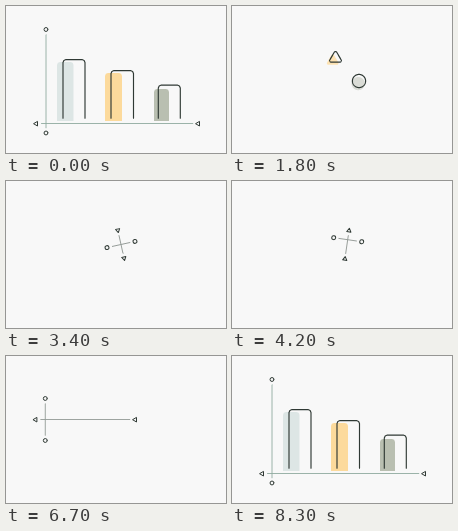
An HTML page with a canvas for the animation above (8.4 s loop, 220x147 px).

```html
<!DOCTYPE html>
<html lang="en">
<head>
<meta charset="utf-8">
<title>Chart loop</title>
<style>
  html, body { margin: 0; width: 100%; height: 100%; overflow: hidden; background: #f8f8f8; }
  canvas { display: block; width: 100vw; height: 100vh; }
</style>
</head>
<body>
<canvas id="stage"></canvas>
<script>
const LOOP = 8400, W = 220, H = 147, INK = '#2f3934';
const HUB = { x: 115, y: 63.5 };
const canvas = document.getElementById('stage');
const ctx = canvas.getContext('2d');

const mix = (a, b, k) => a + (b - a) * k;
const progress = (t, from, to) => Math.max(0, Math.min(1, (t - from) / (to - from)));
const ramp = (t, from, to) => {
  const k = progress(t, from, to);
  return k * k * (3 - 2 * k);
};
// Eased move that shoots a little past its end and settles.
const spring = (t, from, to, s = 1.35) => {
  const u = ramp(t, from, to) - 1;
  return 1 + (s + 1) * u ** 3 + s * u * u;
};

const bars = [
  { fill: '#dde6e5', x: 51, w: 16.5, h: 59, line: 57, lineW: 22, lineH: 58.7 },
  { fill: '#fcda9c', x: 99, w: 17, h: 48, line: 105, lineW: 22.5, lineH: 47.7 },
  { fill: '#b9bfb1', x: 148, w: 15, h: 32, line: 152.3, lineW: 22, lineH: 33.2 }
];

// Closed outline that starts at the bottom and runs clockwise.
const polar = radius => Array.from({ length: 121 }, (_, i) => {
  const a = i / 120 * 2 * Math.PI, r = radius(a);
  return [-r * Math.sin(a), r * Math.cos(a)];
});
const third = 2 * Math.PI / 3;
const triangle = polar(a => Math.min(6.4, 4 / Math.cos((a + third / 2) % third - third / 2)));
const circle = polar(() => 6.6);
const shapes = [
  { bar: bars[1], form: triangle, x: -11.5, y: -11.4, shift: [-2.8, 2.7], tint: '#fde2b2' },
  { bar: bars[2], form: circle, x: 12, y: 11.5, shift: [-0.8, 2.6], tint: '#dadcd6' }
];

function barPoints(x, w, base, h) {
  const r = Math.min(3, h), top = base - h, q = r * 0.29;
  return [[x, base], [x, top + r], [x + q, top + q], [x + r, top],
    [x + w - r, top], [x + w - q, top + q], [x + w, top + r], [x + w, base]];
}

// Evenly spaced points along a polyline.
function spread(points, count = 120) {
  const lengths = points.slice(1).map((p, i) => Math.hypot(p[0] - points[i][0], p[1] - points[i][1]));
  const total = lengths.reduce((a, b) => a + b, 0);
  return Array.from({ length: count + 1 }, (_, n) => {
    let rest = total * n / count, i = 0;
    while (i < lengths.length - 1 && rest > lengths[i]) rest -= lengths[i++];
    const k = lengths[i] ? rest / lengths[i] : 0;
    return [0, 1].map(j => mix(points[i][j], points[i + 1][j], k));
  });
}

const morph = (a, b, k) => {
  const end = spread(b);
  return spread(a).map((p, i) => [mix(p[0], end[i][0], k), mix(p[1], end[i][1], k)]);
};

function trace(points) {
  ctx.beginPath();
  points.forEach(p => ctx.lineTo(p[0], p[1]));
}

function fill(points, color) {
  trace(points);
  ctx.fillStyle = color;
  ctx.fill();
}

function stroke(points, width = 1.15, color = INK) {
  trace(points);
  ctx.lineWidth = width;
  ctx.strokeStyle = color;
  ctx.stroke();
}

function drawBar(bar, grow, base, gap) {
  if (grow <= 0.01) return;
  fill(barPoints(bar.x, bar.w, base - gap, bar.h * grow), bar.fill);
  stroke(barPoints(bar.line, bar.lineW, base - 2.1 * gap, bar.lineH * grow));
}

function drawShape({ bar, form, x, y, shift, tint }, t) {
  const k = ramp(t, 1500, 1780);
  const size = 1 - ramp(t, 2450, 2900);
  if (size <= 0.01) return;
  const a = -Math.PI / 4 * ramp(t, 1900, 2550);
  const reach = mix(0.55, 1, size);
  const cx = HUB.x + (x * Math.cos(a) - y * Math.sin(a)) * reach;
  const cy = HUB.y + (x * Math.sin(a) + y * Math.cos(a)) * reach;
  const place = (dx, dy) => form.map(p => [cx + p[0] * size + dx, cy + p[1] * size + dy]);
  const block = barPoints(bar.x, bar.w, 115, bar.h);
  const frame = barPoints(bar.line, bar.lineW, 112.2, bar.lineH);
  fill(morph(block, place(shift[0] * size, shift[1] * size), k), k > 0.7 ? tint : bar.fill);
  stroke(morph(frame, place(0, 0), k), 1.2);
}

function drawGlyph(x, y, size, round) {
  if (size <= 0.01) return;
  ctx.save();
  ctx.translate(x, y);
  ctx.scale(size, size);
  ctx.beginPath();
  if (round) {
    ctx.arc(0, 0, 1.95, 0, 2 * Math.PI);
  } else {
    ctx.moveTo(-2.1, 0);
    ctx.lineTo(1.5, -2.1);
    ctx.lineTo(1.5, 2.1);
    ctx.closePath();
  }
  ctx.lineWidth = 1;
  ctx.strokeStyle = INK;
  ctx.stroke();
  ctx.restore();
}

// Each pose gives the crossing point, four arm lengths, the turn and the glyph size.
function foldPose(t) {
  const keep = 1 - ramp(t, 1000, 1400), flat = 1 - ramp(t, 1500, 1750);
  return { x: 40, y: 117.5, left: 10 * flat, right: 152 * flat,
    up: 94 * keep, down: 9.5 * keep, turn: 0, glyph: keep };
}

function spinPose(t) {
  const turn = 499 * (1 - progress(t, 2600, 5600)) ** 2.13 * Math.PI / 180;
  const size = ramp(t, 2600, 3300);
  const arm = size * (17.5 + 3.5 * Math.cos(2 * turn));
  const slide = mix(-4.85 * ramp(t, 3400, 4200), 8.5, ramp(t, 4200, 5600));
  return { x: HUB.x + slide * Math.cos(turn), y: HUB.y + slide * Math.sin(turn),
    left: 14.3 * size + slide, right: 14.3 * size - slide, up: arm, down: arm, turn, glyph: size };
}

function growPose(t) {
  const out = spring(t, 5800, 6900), rise = spring(t, 6920, 8200);
  const x = mix(123.5, 40, out), y = mix(HUB.y, 117.5, rise);
  const left = mix(100, 30, out), right = mix(129, 192, rise);
  const top = mix(42.5, 23.5, spring(t, 7450, 8200));
  const bottom = mix(84.5, 127, rise) + 10 * Math.sin(Math.PI * ramp(t, 7400, 8000));
  return { x, y, left: x - left, right: right - x, up: y - top, down: bottom - y, turn: 0, glyph: 1 };
}

const poseAt = t => (t < 2600 ? foldPose : t < 5800 ? spinPose : growPose)(t);

function drawCross(pose, color) {
  const end = arm => Math.max(0, arm - 5.2);
  ctx.save();
  ctx.translate(pose.x, pose.y);
  ctx.rotate(pose.turn);
  if (pose.left + pose.right > 0.5) stroke([[-end(pose.left), 0], [end(pose.right), 0]], 0.9, color);
  if (pose.up + pose.down > 0.5) stroke([[0, -end(pose.up)], [0, end(pose.down)]], 0.9, color);
  drawGlyph(-pose.left, 0, pose.glyph, false);
  drawGlyph(pose.right, 0, pose.glyph, false);
  drawGlyph(0, -pose.up, pose.glyph, true);
  drawGlyph(0, pose.down, pose.glyph, true);
  ctx.restore();
}

function draw(t) {
  const scale = window.devicePixelRatio || 1;
  const width = Math.round(innerWidth * scale), height = Math.round(innerHeight * scale);
  if (canvas.width !== width || canvas.height !== height) {
    canvas.width = width;
    canvas.height = height;
  }
  ctx.setTransform(width / W, 0, 0, height / H, 0, 0);
  ctx.fillStyle = '#f8f8f8';
  ctx.fillRect(0, 0, W, H);
  ctx.lineJoin = ctx.lineCap = 'round';

  const pose = poseAt(t);
  if (t < 1500) {
    bars.forEach(bar => drawBar(bar, 1, 117.5, 2.5));
  } else if (t < 3000) {
    drawBar(bars[0], 1 - ramp(t, 1500, 1720), 117.5, 2.5);
    shapes.forEach(shape => drawShape(shape, t));
  } else {
    const gap = mix(1.1, 2.5, ramp(t, 7400, 7700));
    bars.forEach((bar, i) => {
      const from = 6850 + 50 * i * i;
      drawBar(bar, ramp(t, from, from + 700), pose.y, gap);
    });
  }
  drawCross(pose, t < 1800 || t > 7600 ? '#91aca1' : '#949b97');
}

const start = performance.now();
function tick() {
  draw((performance.now() - start) % LOOP);
  requestAnimationFrame(tick);
}
tick();
</script>
</body>
</html>
```
